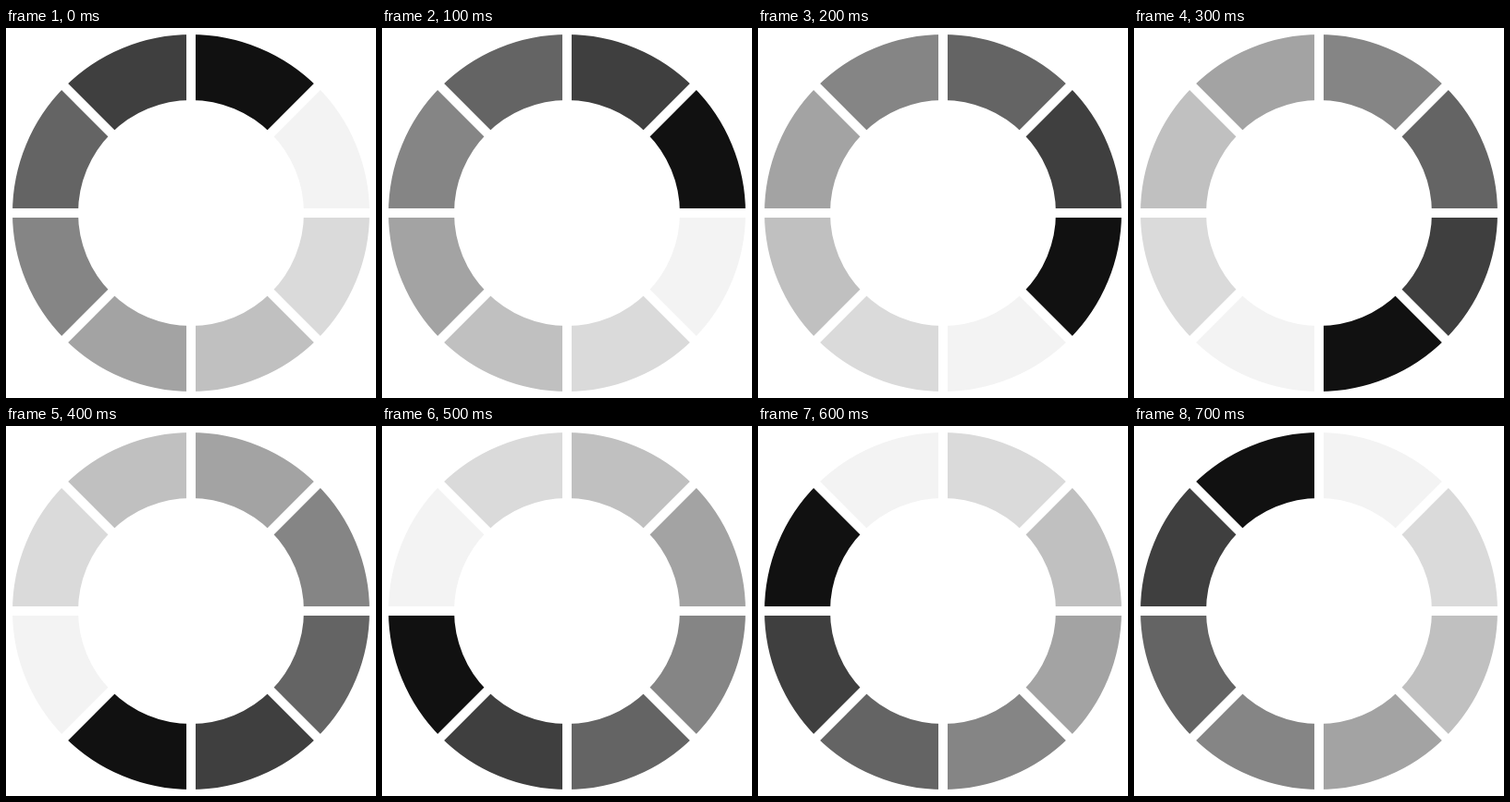
An HTML page with a canvas that plays this animation: 400x400 px, repeating every 800 ms.

```html
<!DOCTYPE html>
<html>
<head>
<meta charset="utf-8">
<style>
  html, body { margin: 0; height: 100%; overflow: hidden; background: #fff; }
  canvas { display: block; }
</style>
</head>
<body>
<canvas width="400" height="400"></canvas>
<script>
const ctx = document.querySelector('canvas').getContext('2d');
const shades = [17, 63, 100, 133, 163, 192, 218, 243];
const count = shades.length, stepMs = 100;
const inner = 122, outer = 193, gap = 10;
const turn = 2 * Math.PI / count;

function draw(step) {
  ctx.setTransform(1, 0, 0, 1, 200, 200);
  ctx.fillStyle = '#fff';
  ctx.fillRect(-200, -200, 400, 400);

  ctx.lineWidth = outer - inner;
  for (let i = 0; i < count; i++) {
    const v = shades[(step - i + count) % count];
    const start = i * turn - Math.PI / 2;
    ctx.strokeStyle = `rgb(${v}, ${v}, ${v})`;
    ctx.beginPath();
    ctx.arc(0, 0, (inner + outer) / 2, start, start + turn);
    ctx.stroke();
  }

  // White spokes separate the segments
  for (let i = 0; i < count / 2; i++) {
    ctx.fillRect(-200, -gap / 2, 400, gap);
    ctx.rotate(turn);
  }
}

function tick() {
  draw(Math.floor(performance.now() / stepMs) % count);
  requestAnimationFrame(tick);
}
tick();
</script>
</body>
</html>
```
